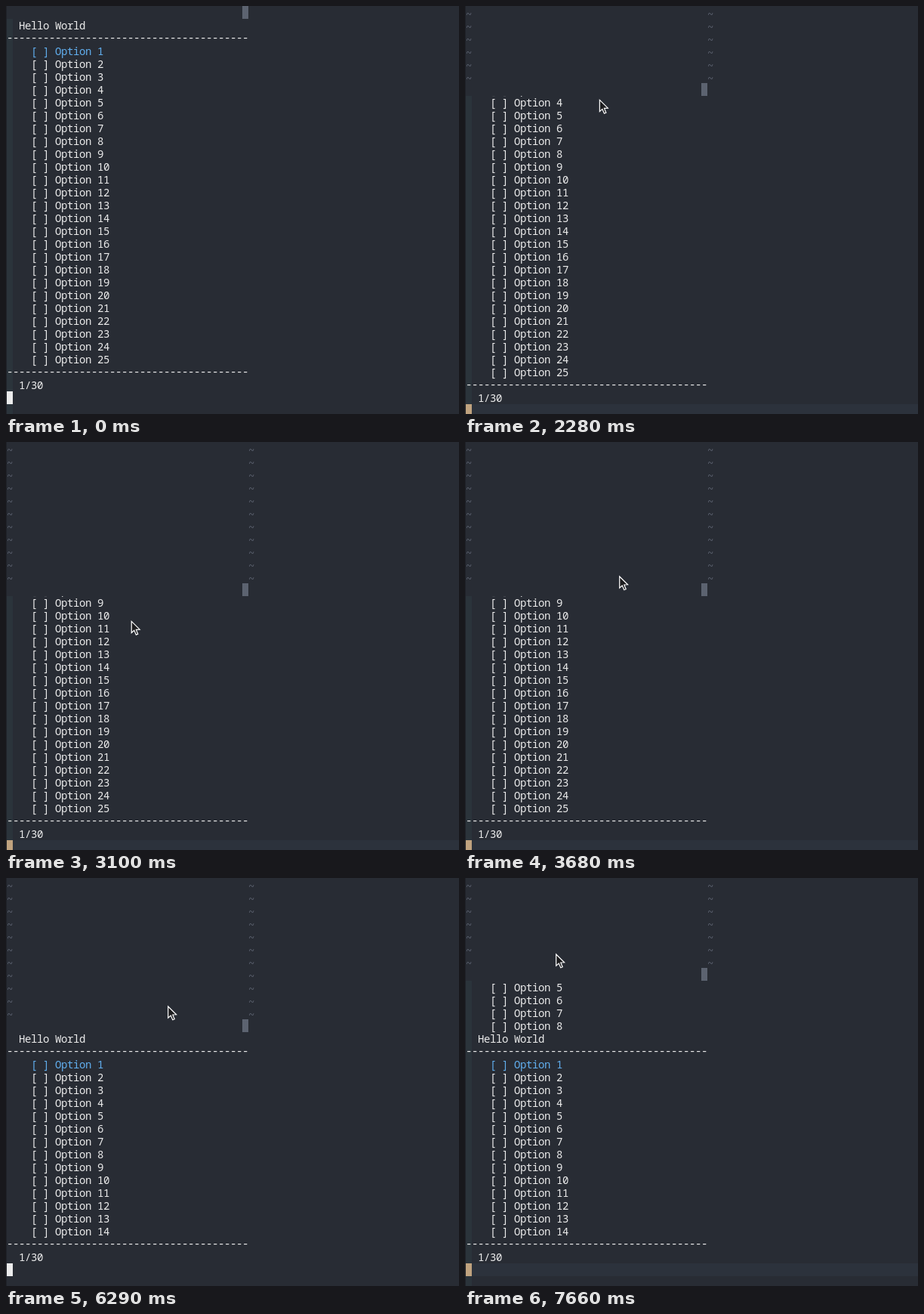
Recreate the animation shown at these times as an HTML page with a canvas. Size 600 by 540 pixels, loop 7.68 s.

```html
<!DOCTYPE html>
<html lang="en">
<head>
<meta charset="utf-8">
<title>Terminal menu</title>
<style>
  html, body { margin: 0; width: 100%; height: 100%; overflow: hidden; background: #282c34; }
  canvas { display: block; }
</style>
</head>
<body>
<canvas id="stage" width="600" height="540"></canvas>
<script>
const ctx = document.getElementById('stage').getContext('2d');
const LOOP = 7680, CELL = 8, LINE = 17, JUMP = 50;
const DRAG_DOWN = 2010, RELEASE = 3150, TYPING = 4490, REDRAW = 4890;
const SWIRL = 6570, SWIRL_END = 7060, DRAG_UP = 7350;
const BG = '#282c34', TINT = '#2c323c', STRIP = '#2b343b', DIM = '#5c6370';
const FG = '#ececec', BLUE = '#61afef', TAN = '#c0a37f';

// Pointer glides: start, end, final x, final y
const glides = [
  [570, 570, 359, 221],
  [1230, 1690, 180, 0],
  [DRAG_DOWN, 2480, 177, 158],
  [2770, RELEASE, 165, 240],
  [3400, 3680, 204, 177],
  [6290, 6290, 214, 169],
  [SWIRL_END, SWIRL_END, 129, 169],
  [7170, 7310, 125, 190],
  [DRAG_UP, 7660, 120, 100]
];

// Progress from 0 to 1, in jumps as the pointer was sampled
function progress(t, start, end) {
  if (t >= end) return 1;
  return Math.floor((t - start) / JUMP) * JUMP / (end - start);
}

function pointerAt(t) {
  if (t >= SWIRL && t < SWIRL_END) {
    const u = progress(t, SWIRL, SWIRL_END);
    return {
      x: 200 - 71 * u - 164 * Math.sin(Math.PI * u),
      y: 169 - 185 * (1 - .6 * u) * Math.sin(2 * Math.PI * u)
    };
  }
  let x = 0, y = 0;
  for (const [start, end, toX, toY] of glides) {
    if (t < start) break;
    const ease = 1 - (1 - progress(t, start, end)) ** 2;
    x += (toX - x) * ease;
    y += (toY - y) * ease;
  }
  return { x, y };
}

const pointerShown = t => t >= 570 && t < 4390 || t >= 6290 && t < 6330 || t >= SWIRL;

// Row of the status line, which lags behind the dragging pointer
function statusRow(t, y) {
  const row = Math.floor(y / LINE);
  if (t < DRAG_DOWN) return 0;
  if (t < RELEASE) return Math.max(0, Math.min(11, row - 1));
  return t < DRAG_UP ? 11 : Math.min(11, row + 2);
}

function block(col, row, color, cols = 1, rows = 1) {
  ctx.fillStyle = color;
  ctx.fillRect(1 + col * CELL, row * LINE, cols * CELL, rows * LINE);
}

function write(text, col, row, color = FG, lift = 0) {
  ctx.fillStyle = color;
  ctx.fillText(text, 1 + col * CELL, row * LINE + 14 - lift);
}

function menu(top, count) {
  const rule = '-'.repeat(40);
  write('Hello World', 2, top);
  write(rule, 0, top + 1, FG, 1);
  for (let i = 1; i <= count; i++)
    write('[ ] Option ' + i, 4, top + 1 + i, i === 1 ? BLUE : FG);
  write(rule, 0, top + count + 2, FG, 1);
  write('1/30', 2, top + count + 3);
}

function pointer({ x, y }) {
  ctx.save();
  ctx.translate(x, y);
  ctx.beginPath();
  [[.7, 1], [.7, 16.2], [4.2, 13], [6.8, 18.8], [9.2, 17.8], [6.8, 12], [11.6, 11.8]]
    .forEach(p => ctx.lineTo(...p));
  ctx.closePath();
  ctx.fillStyle = '#1c1c1e';
  ctx.fill();
  ctx.strokeStyle = '#fff';
  ctx.lineWidth = 1.2;
  ctx.stroke();
  ctx.restore();
}

function draw(t) {
  const mouse = pointerAt(t);
  const status = statusRow(t, mouse.y);
  const normal = t >= DRAG_DOWN && t < TYPING || t >= DRAG_UP;
  const count = t < REDRAW ? 25 : 14;
  const top = t >= REDRAW ? 12 : status ? 2 : 1;
  const cursor = top + count + 4;

  ctx.fillStyle = BG;
  ctx.fillRect(0, 0, 600, 540);
  // Tracking keeps the 14px face on the 8px grid
  ctx.font = '500 14px "Noto Sans Mono", "DejaVu Sans Mono", monospace';
  ctx.letterSpacing = '-0.4px';

  if (normal || t < DRAG_DOWN) block(0, status + 1, STRIP, 1, 31 - status);
  if (normal) block(0, cursor, TINT, 75);
  block(0, cursor, normal ? TAN : FG);

  ctx.save();
  ctx.beginPath();
  ctx.rect(0, (status + 1) * LINE, 600, 540);
  ctx.clip();
  menu(top, count);
  if (t >= DRAG_UP)
    for (let i = 5; i <= 8; i++) write('[ ] Option ' + i, 4, 3 + i);
  ctx.restore();

  for (let row = 0; row < status; row++)
    for (const col of [0, 40]) write('~', col, row, DIM, -2);
  block(39, status, DIM);
  ctx.fillStyle = '#1f2228';
  ctx.fillRect(0, 0, 1, 540);

  if (pointerShown(t)) pointer(mouse);
}

const began = performance.now();
function tick() {
  draw((performance.now() - began) % LOOP);
  requestAnimationFrame(tick);
}
tick();
</script>
</body>
</html>
```
